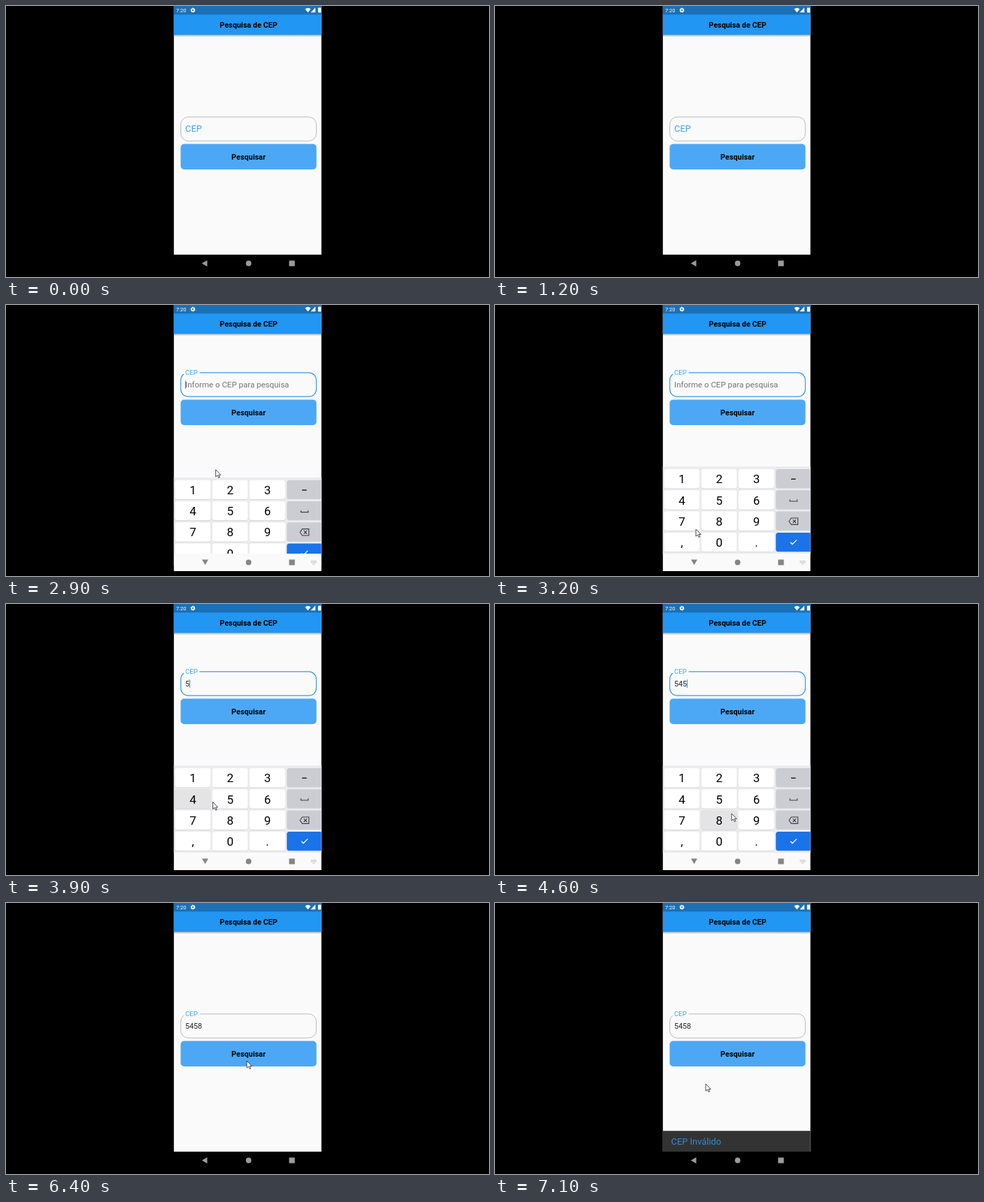
An HTML page for the animation above (8 s loop, 690 by 388 pixels).

```html
<!DOCTYPE html>
<html lang="pt">
<head>
<meta charset="utf-8">
<style>
html, body { margin: 0; width: 100%; height: 100%; overflow: hidden; background: #000; }
svg { display: block; width: 100vw; height: 100vh; font-family: Roboto, sans-serif; }
.mid { text-anchor: middle; }
.bold { font-weight: 700; font-size: 10.85px; }
</style>
</head>
<body>
<svg viewBox="0 0 690 388">
  <defs>
    <linearGradient id="shade" x2="0" y2="1">
      <stop stop-opacity=".32"/><stop offset="1" stop-opacity="0"/>
    </linearGradient>
    <clipPath id="screen"><path d="M239.8 0H450.6V388H239.8Z"/></clipPath>
  </defs>
  <path d="M0 0H690V388H0Z"/>
  <g clip-path="url(#screen)">
    <path d="M239 0H451V356H239Z" fill="#fafafa"/>
    <path d="M239 41H451V44.5H239Z" fill="url(#shade)"/>
    <path d="M239 12H451V41.3H239Z" fill="#2196f3"/>
    <path d="M239 0H451V12.2H239Z" fill="#1b70b6"/>
    <g fill="#fff">
      <text x="243" y="8.7" font-size="7.5">7:20</text>
      <circle cx="267" cy="6" r="2" fill="none" stroke="#fff" stroke-width="1.7"/>
      <circle cx="267" cy="6" r="3" fill="none" stroke="#fff" stroke-width="1" stroke-dasharray="1.57"/>
      <path d="M427.3 4.4Q431.3 1 435.3 4.4L431.3 9.3ZM442 2.3V9.3H435.3Z"/>
      <rect x="445.8" y="2.6" width="4.3" height="7" rx=".8"/>
    </g>
    <text class="mid bold" x="346.5" y="30.6">Pesquisa de CEP</text>

    <g id="form">
      <rect id="box" x="249.7" y="158.9" width="193.6" height="34.3" rx="10.7" fill="none"/>
      <rect id="gap" x="253.7" y="157" height="4" fill="#fafafa"/>
      <text id="label" x="256">CEP</text>
      <text id="hint" x="256" y="179.5" font-size="11.5" fill="#747474">Informe o CEP para pesquisa</text>
      <text id="value" x="256" y="180" font-size="10.74" fill="#222"></text>
      <rect id="caret" y="170" width="1" height="12" fill="#2196f3"/>
      <rect x="249.5" y="197.5" width="194" height="36.5" rx="5" fill="#4ca8f4"/>
      <text class="mid bold" x="346.5" y="219.8">Pesquisar</text>
    </g>

    <g id="snack">
      <path d="M239 326.3H451V357H239Z" fill="#333"/>
      <text id="msg" x="251.5" y="345.7" font-size="12.9" fill="#2e8bdc">CEP Inválido</text>
    </g>

    <g id="keys">
      <path d="M239 231.3H451V357H239Z" fill="#ebebef"/>
    </g>

    <path d="M239 356H451V388H239Z"/>
    <path id="navBack" d="M239 356H451V381H239Z" fill="#fafafa"/>
    <g id="nav">
      <path id="back"/>
      <circle cx="346.6" cy="368.5" r="3.9"/>
      <path d="M404.4 364.4H412.6V372.6H404.4Z"/>
    </g>
    <path id="kbIcon" d="M435.5 366.8H444M435.5 368.8H444M438 371H441.5" stroke="#aaa" stroke-width="1" stroke-dasharray="1.2 .5"/>
  </g>
  <path id="mouse" d="M0 0V10.2L2.4 8L4.1 11.6L5.7 10.9L4.1 7.5H7.2Z" fill="#fff" stroke="#222" stroke-width=".8" stroke-linejoin="round"/>
</svg>
<script>
const $ = id => document.getElementById(id);
const set = (id, attrs) => { for (const k in attrs) $(id).setAttribute(k, attrs[k]); };
const show = (id, on) => set(id, { visibility: on ? 'visible' : 'hidden' });
const ramp = (t, from, length) => Math.min(1, Math.max(0, (t - from) / length));
const mix = (a, b, p) => a + (b - a) * p;
const easeOut = p => 1 - (1 - p) ** 3;

function add(tag, attrs, text = '') {
  const el = document.createElementNS('http://www.w3.org/2000/svg', tag);
  for (const k in attrs) el.setAttribute(k, attrs[k]);
  el.textContent = text;
  $('keys').append(el);
  return el;
}

const caps = {};
['123-', '456_', '789<', ',0.v'].forEach((row, r) => [...row].forEach((key, c) => {
  const x = 241.3 + c * 53.3, y = 235 + r * 30.3;
  const size = { x, width: 51, height: 27.4, rx: 3.5 };
  const fill = c < 3 ? '#fff' : key == 'v' ? '#1a73e8' : '#cbcdd3';
  if (c < 3) add('rect', { ...size, y: y + .8, fill: '#d0d1d5' });
  caps[key] = add('rect', { ...size, y, fill });
  if (c < 3) add('text', { x: x + 25.7, y: y + 20.2, 'font-size': 17, class: 'mid' }, key);
}));
const icon = (d, stroke = '#3c4043', width = 1.1) =>
  add('path', { d, stroke, 'stroke-width': width, fill: 'none' });
icon('M423 249.3H429.5', '#222', 1.4);
icon('M421.3 278.3V281H431.7V278.3');
icon('M420 309.7L423.3 305H432.7V314.4H423.3ZM425.5 307.3L430 312M430 307.3L425.5 312');
icon('M422 339.8L424.8 342.5L431 336.4', '#fff', 1.3);

const LOOP = 8000, FOCUS = 2800, DONE = 5800;
const typed = [[3800, '5'], [4100, '4'], [4400, '5'], [4800, '8']];
// time, x, y of the pointer
const path = [
  [2200, 260, 212], [2500, 308, 179], [2700, 308, 179], [3200, 287, 321],
  [3400, 300, 308], [3600, 317, 284], [3800, 317, 284], [4000, 274, 283],
  [4100, 274, 283], [4300, 322, 284], [4400, 322, 284], [4600, 338, 300],
  [4800, 338, 300], [5300, 422, 343], [5500, 422, 343], [5700, 411, 319],
  [6200, 345, 225], [6300, 345, 225], [6400, 344, 226], [6700, 305, 257],
  [6800, 305, 257], [7100, 301, 259]
];

function pointer(t) {
  const i = path.findIndex(p => p[0] > t);
  if (i < 0) return path.at(-1).slice(1);
  const [t0, x0, y0] = path[Math.max(0, i - 1)], [t1, x1, y1] = path[i];
  const p = ramp(t, t0, t1 - t0 || 1);
  return [mix(x0, x1, p), mix(y0, y1, p)];
}

function draw(t) {
  const focus = t >= FOCUS && t < DONE;
  const float = ramp(t, FOCUS - 100, 200);
  const kb = Math.min(easeOut(ramp(t, 2800, 200)), 1 - ramp(t, 5700, 200));
  const open = kb > 0;
  const done = typed.filter(k => k[0] <= t);
  const text = done.map(k => k[1]).join('');

  set('form', { transform: `translate(0 ${open && t < DONE ? -62 : 0})` });
  set('box', { stroke: focus ? '#3d9ae0' : '#b4b4b4', 'stroke-width': focus ? 1.2 : .9 });
  set('gap', { width: 23 * float });
  set('label', {
    y: mix(179.7, 162.2, float), 'font-size': mix(12.9, 9.67, float), fill: '#45a1e4'
  });
  set('hint', { opacity: text ? 0 : float });
  $('value').textContent = text;

  const since = t - (done.length ? done.at(-1)[0] : FOCUS - 200);
  show('caret', focus && since % 1000 < 500);
  set('caret', { x: 256 + (text ? $('value').getComputedTextLength() : 0) });

  show('keys', open);
  set('keys', { transform: `translate(0 ${125 * (1 - kb)})` });
  for (const d of '458') {
    const down = typed.some(k => k[1] == d && t >= k[0] - 200 && t < k[0]);
    caps[d].setAttribute('fill', down ? '#e4e4e4' : '#fff');
  }
  show('navBack', open);
  show('kbIcon', open);
  set('nav', { fill: open ? '#858585' : '#9b9b9b' });
  set('back', { d: open ? 'M280 364.5H289L284.5 372.3Z' : 'M287.5 364V373L279.8 368.5Z' });

  const rise = easeOut(ramp(t, 6400, 250));
  show('snack', rise > 0);
  set('snack', { transform: `translate(0 ${30 * (1 - rise)})` });
  set('msg', { opacity: ramp(t, 6460, 150) });

  show('mouse', t >= path[0][0]);
  set('mouse', { transform: `translate(${pointer(t)})` });
}

// The screen refreshes ten times a second
const start = performance.now();
function tick() {
  draw(Math.floor((performance.now() - start) % LOOP / 100) * 100);
  requestAnimationFrame(tick);
}
tick();
</script>
</body>
</html>
```
